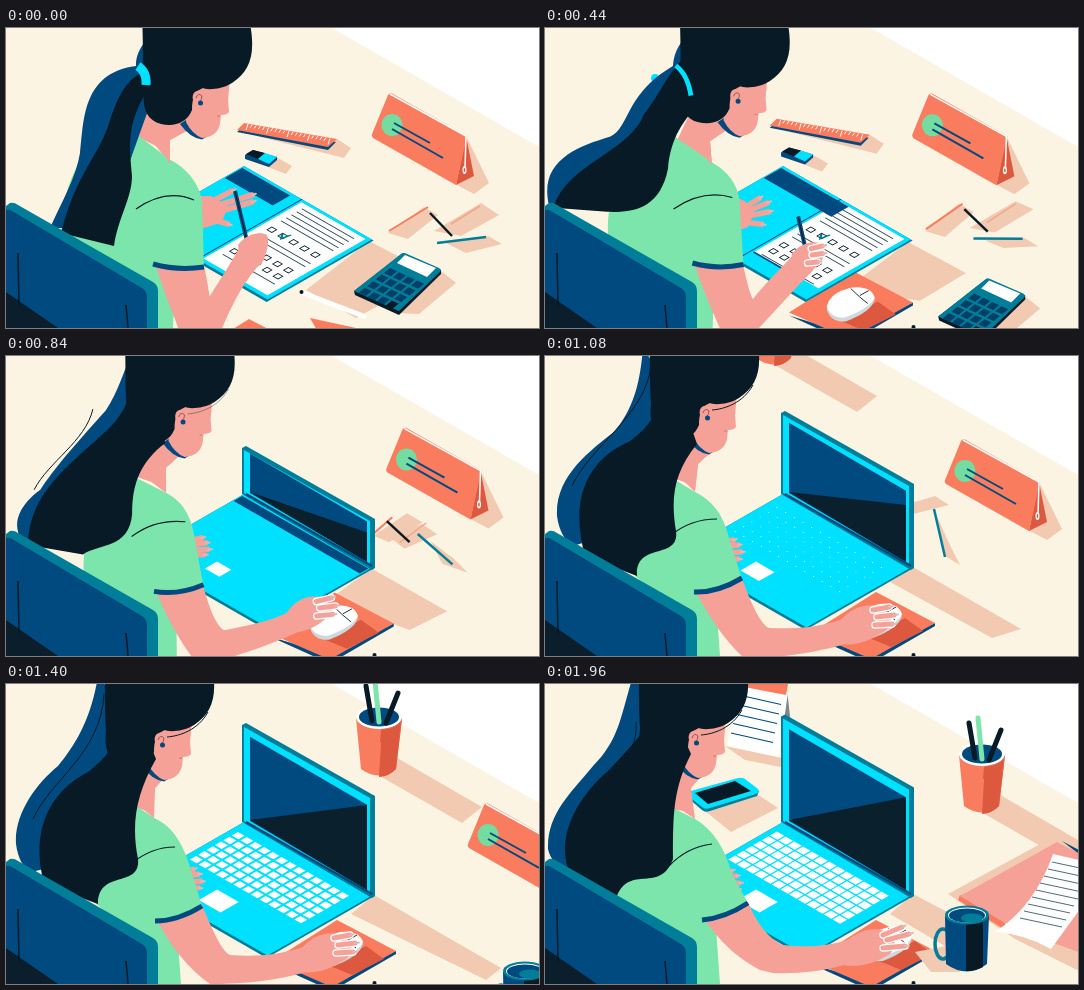
These frames come from a looping animation (533x300 px, 2000 ms). An HTML page with a canvas:

```html
<!DOCTYPE html>
<html lang="en">
<head>
<meta charset="utf-8">
<title>At the desk</title>
<style>
html, body { margin: 0; width: 100%; height: 100%; overflow: hidden; background: #fcf4e2; }
canvas { display: block; width: 100vw; height: 100vh; }
</style>
</head>
<body>
<canvas id="stage"></canvas>
<script>
const W = 533, H = 300, LOOP = 2000, STEP = 40;
const CREAM = '#fcf4e2', PEACH = '#f2cab1', ORANGE = '#fa7c5f', RUST = '#dc583f', CYAN = '#00e0ff',
  BLUE = '#004a7f', TEAL = '#007d98', INK = '#071a26', SKIN = '#f6a197', GREEN = '#7be5ab', WHITE = '#fff';

const canvas = document.getElementById('stage');
const ctx = canvas.getContext('2d');
let now = 0;

const numbers = s => String(s).match(/-?\d*\.?\d+/g).map(Number);

// Smooth, overshoot-free value between timed keys.
function ease(times, vals) {
  const last = times.length - 1;
  if (now <= times[0]) return vals[0];
  if (now >= times[last]) return vals[last];
  let i = 0;
  while (times[i + 1] < now) i++;
  const slope = k => (vals[k + 1] - vals[k]) / (times[k + 1] - times[k]);
  const tangent = k => {
    if (k === 0) return slope(0);
    if (k === last) return slope(last - 1);
    const a = slope(k - 1), b = slope(k);
    return a * b <= 0 ? 0 : 2 * a * b / (a + b);
  };
  const d = times[i + 1] - times[i], u = (now - times[i]) / d, v = 1 - u;
  return vals[i] * (1 + 2 * u) * v * v + tangent(i) * d * u * v * v
    + vals[i + 1] * u * u * (3 - 2 * u) - tangent(i + 1) * d * u * u * v;
}

// Keys map times to strings of one structure; the result is the pose for now.
function pose(keys) {
  const times = Object.keys(keys).map(Number);
  const sets = times.map(t => numbers(keys[t]));
  let i = 0;
  return String(keys[times[0]]).replace(/-?\d*\.?\d+/g, () => {
    const k = i++;
    return ease(times, sets.map(s => s[k])).toFixed(2);
  });
}
const value = keys => Number(pose(keys));

function fill(path, color) {
  ctx.fillStyle = color;
  ctx.fill(new Path2D(path));
}
function line(path, color, width = 1.5, cap = 'butt') {
  ctx.strokeStyle = color;
  ctx.lineWidth = width;
  ctx.lineCap = cap;
  ctx.stroke(new Path2D(path));
}
function oval(x, y, rx, ry, color) {
  ctx.beginPath();
  ctx.ellipse(x, y, rx, ry, 0, 0, 7);
  ctx.fillStyle = color;
  ctx.fill();
}
function at(keys, draw) {
  const [x, y] = numbers(pose(keys));
  ctx.save();
  ctx.translate(x, y);
  draw();
  ctx.restore();
}
// Desk plane: u runs along the hinge, v towards the writer.
function onDesk(draw) {
  ctx.save();
  ctx.transform(.87, .5, -.87, .5, 238, 138);
  draw();
  ctx.restore();
}
function box(x, y, w, h, color) {
  ctx.fillStyle = color;
  ctx.fillRect(x, y, w, h);
}

function shadows() {
  fill(pose({
    0: 'M363 213L428 247L350 290L300 262Z',
    240: 'M363 214L428 248L375 280L300 262Z',
    600: 'M363 214L416 243L375 270L300 262Z',
    1080: 'M368 211L476 273L447 282L345 226Z',
    1400: 'M368 211L495 284L480 296L345 230Z',
    1720: 'M368 211L430 246L402 268L345 230Z',
    1960: 'M368 210L425 240L400 262L345 230Z'
  }), PEACH);
}

function ruler() {
  fill('M331 111L345 120L338 130L250 108Z', PEACH);
  fill('M231 104L238 98L330 114L322 122Z', BLUE);
  fill('M238 95L331 111L322 119L231 102Z', ORANGE);
  let ticks = '';
  for (let i = 0; i < 21; i++) ticks += `M${242 + i * 4.1} ${96 + i * .72}l-2 ${i % 5 ? 3 : 6}`;
  line(ticks, WHITE, 1);
}

function eraser() {
  fill('M246 133L272 130L286 138L280 146Z', PEACH);
  fill('M239 127L247 122L271 129L271 132L263 139L239 131Z', BLUE);
  fill('M240 126L247 122L259 125L252 131Z', INK);
  fill('M252 131L259 125L271 129L263 136Z', CYAN);
}

function pouch() {
  fill('M461 110L483 155L468 166L432 147Z', PEACH);
  fill('M460 108L468 148L450 157Z', RUST);
  fill('M366 106L382 67Q384 64 387 66L461 108L450 157L367 110Q365 108 366 106Z', ORANGE);
  line('M384 66L460 108L459 140', WHITE, 1.5);
  oval(458.5, 142, 2, 4, WHITE);
  oval(458.5, 142, .8, 2, RUST);
  oval(386, 97, 10.5, 11, '#74dca0');
  line('M388 95L424 115M386 101L437 130', BLUE, 2);
}

function sticks() {
  fill(pose({
    0: 'M382 205L418 179L432 187L402 211Z', 240: 'M382 205L418 179L432 187L402 211Z',
    600: 'M377 199L408 170L424 179L396 205Z', 1080: 'M350 152L390 140L404 149L360 160Z',
    1300: 'M300 130L330 120L345 130L310 140Z'
  }), PEACH);
  fill(pose({
    0: 'M428 203L475 175L493 187L455 208Z', 240: 'M428 203L475 175L493 187L455 208Z',
    600: 'M418 195L462 171L480 177L440 200Z', 1080: 'M330 160L350 165L360 180L340 185Z'
  }), PEACH);
  fill(pose({
    0: 'M440 215L482 208L496 216L460 225Z', 240: 'M440 215L482 208L496 216L460 225Z',
    600: 'M440 208L473 211L488 220L455 214Z', 1080: 'M392 160L403 185L415 209L400 200Z',
    1300: 'M320 150L330 160L340 180L330 180Z'
  }), PEACH);
  line(pose({ 0: 'M383 203L422 179', 240: 'M383 203L422 179', 600: 'M377 198L410 171', 1080: 'M330 170L355 150' }), ORANGE, 2);
  line(pose({ 0: 'M445 196L474 178', 240: 'M445 196L474 178', 600: 'M436 192L464 173', 1080: 'M330 180L355 160' }), '#f0a68e', 1.5);
  line(pose({ 0: 'M424 185L446 208', 240: 'M424 184L447 207', 600: 'M411 177L435 199', 1080: 'M340 150L360 170' }), INK, 2.5);
  line(pose({
    0: 'M431 215L480 209', 240: 'M431 214L480 209', 600: 'M424 205L473 212',
    1080: 'M389 153L400 201', 1300: 'M320 150L335 190'
  }), TEAL, 2.5);
}

function calculator() {
  fill('M435 243L450 255L413 286L388 285Z', PEACH);
  fill('M348 263L397 225L435 242V246L393 287L349 267Z', INK);
  fill('M348 263L395 226Q398 224 401 226L433 240Q436 242 434 244L393 283Z', TEAL);
  fill('M399 227L430 240L421 249L391 235Z', WHITE);
  for (let r = 0; r < 4; r++) for (let c = 0; c < 4; c++) {
    fill(`M${384 + c * 9 - r * 8.4} ${240 + c * 4.2 + r * 6.6}l7 3.2l-6 5l-7 -3.2Z`, r === 3 && c === 3 ? INK : '#003f68');
  }
}

function cup() {
  fill('M450 108L540 160L520 176L436 128Z', PEACH);
  fill('M414 71L419 122Q437 135 454 122L460 71Z', ORANGE);
  fill('M440 80L437 130Q448 129 454 122L460 71Z', RUST);
  oval(437, 70, 23, 12, WHITE);
  oval(437, 70, 20, 9.5, BLUE);
  line('M424 39L430 74M456 46L444 76', INK, 5, 'round');
  line('M433 34L437 75', GREEN, 5, 'round');
  fill('M415 75Q437 91 459 75L458 88Q437 96 416 88Z', ORANGE);
  fill('M439 83Q452 82 459 75L457 92L438 95Z', RUST);
}

function mug() {
  fill('M401 262L370 268L386 288L415 288Z', PEACH);
  ctx.beginPath();
  ctx.ellipse(398, 260, 8, 15, 0, 0, 7);
  ctx.strokeStyle = TEAL;
  ctx.lineWidth = 3.5;
  ctx.stroke();
  fill('M400 232L401 280Q422 295 442 280L444 232Z', BLUE);
  fill('M421 240L421 287Q431 287 438 283L438 236Z', INK);
  oval(422, 231, 22, 9.5, TEAL);
  oval(422, 231, 19, 7.5, WHITE);
  oval(422, 231.5, 18, 7, BLUE);
  oval(427, 234, 11, 4.5, TEAL);
}

function phone() {
  fill('M160 127L212 110L233 124L186 148Z', PEACH);
  fill('M142 111L143 114L157 126Q160 129 165 127L212 112L214 107Z', TEAL);
  fill('M142 108L193 94Q197 93 200 95L213 105Q215 108 211 110L165 124Q160 126 157 123L143 112Z', CYAN);
  fill('M150 109L190 97L206 107L163 120Z', INK);
}

function notepad() {
  fill('M180 62L237 74L241 84L200 76Z', PEACH);
  fill('M242 6L245 32L238 46Z', '#7c8791');
  fill('M195 -5L243 8L234 73L182 62Z', WHITE);
  fill('M197 -6L243 0L241 11L194 2Z', ORANGE);
  for (let i = 0; i < 5; i++) line(`M${194 - i * 2} ${11 + i * 9.5}l42 9.5`, BLUE, 1.2);
}

function papers() {
  fill('M403 210L510 152L620 200L620 330L470 255Z', PEACH);
  fill('M517 157L560 180L560 190Z', BLUE);
  fill('M415 211L460 238V246L413 216Z', ORANGE);
  fill('M415 212L512 158L620 215L620 300L470 245Z', SKIN);
  fill('M508 170L565 183Q535 225 506 265Q480 250 450 248Q490 222 508 170Z', WHITE);
  for (let i = 0; i < 9; i++) line(`M${507 - i * 4} ${178 + i * 7}l42 9`, '#3c5a70', .9);
}

function mousePad() {
  fill('M258 282L318 309L382 272V269L318 300Z', BLUE);
  fill('M258 279L323 238L382 269L318 305Z', ORANGE);
}

function mouse() {
  fill('M306 287L344 268L362 281L330 297Z', RUST);
  fill('M293 276Q296 260 318 255Q338 253 341 266Q338 278 312 288Q297 289 293 276Z', '#cfd8dc');
  fill('M293 273Q296 259 318 254Q337 252 341 264Q336 275 311 284Q297 285 293 273Z', WHITE);
  line('M317 255Q326 264 334 270M326 262L335 257', INK, .9);
}

function sheet() {
  const end = value({ 0: 116, 240: 116, 600: 78, 800: 3 });
  const band = value({ 0: 57, 240: 58, 600: 111, 720: 147 });
  const seam = value({ 0: 1, 500: 1, 800: 0 });
  if (seam > 0) box(66, 0, 1.2 * seam, 120, BLUE);
  if (end > 4) {
    ctx.save();
    ctx.beginPath();
    ctx.rect(69, 3, 74, end - 3);
    ctx.clip();
    box(69, 3, 74, 113, WHITE);
    for (const v of [9, 15, 21, 27, 33, 59, 65, 100]) box(76, v, 60, 1, '#29434f');
    ctx.strokeStyle = INK;
    ctx.lineWidth = .9;
    for (const v of [45, 76, 88]) for (let i = 0; i < 5; i++) ctx.strokeRect(77 + i * 12.5, v, 5.5, 5.5);
    line('M90 46L94 51L96 42', TEAL, 2);
    ctx.restore();
    if (now > 400) box(69, end, 42, Math.min(9, (now - 400) / 22), BLUE);
  }
  const fade = value({ 0: 20, 600: 20, 1000: 0 });
  box(1, 3, band - 2, fade, BLUE);
}

function keyboard() {
  const pad = value({ 520: 0, 640: .4, 1080: .85, 1400: 1 });
  box(52, 83, 25 * pad, 21 * pad, WHITE);
  const size = value({ 1040: 0, 1400: .9, 1720: 1 });
  if (size <= 0) return;
  for (let r = 0; r < 6; r++) for (let c = 0; c < 13; c++) {
    box(6 + c * 10 + (1 - size) * 4, 13 + r * 9.6 + (1 - size) * 4, 8.6 * size, 8 * size, WHITE);
  }
}

function base() {
  onDesk(() => {
    box(0, 0, 149, 123, TEAL);
    box(0, 0, 147, 120, CYAN);
    sheet();
    keyboard();
  });
}

function lid() {
  const h = value({ 600: 0, 1080: 81, 1400: 97, 1720: 104, 1960: 105.5 });
  if (h < 1) return;
  const top = .88 * h;
  fill(`M236 138V${138 - h}L240 ${136 - h}L369 ${209 - h}V212L366 214Z`, TEAL);
  fill(`M238 137V${140 - h}L364 ${211 - h}V209Z`, CYAN);
  fill(`M244 137V${138 - top}L361 ${206 - top}V206Z`, BLUE);
  const glare = Math.max(206 - top, value({ 600: 206, 1080: 149, 1400: 121, 1960: 109 }));
  fill(`M244 136L361 ${glare}V206Z`, '#0a202d');
  line('M240 138L366 210', BLUE, 2.5);
}

function fingers(path, width) {
  line(path, SKIN, width, 'round');
  const n = numbers(path);
  for (let i = 0; i < n.length; i += 4) {
    const a = Math.atan2(n[i + 3] - n[i + 1], n[i + 2] - n[i]);
    line(`M${n[i + 2]} ${n[i + 3]}l${4 * Math.cos(a)} ${4 * Math.sin(a)}`, '#dfb9b5', 2, 'round');
  }
}

function leftHand() {
  fill(pose({
    0: 'M188 168L205 168L222 178L216 194L190 203Z', 240: 'M188 168L207 170L220 182L212 197L190 204Z',
    600: 'M180 165L193 176L199 186L196 200L185 206Z', 1080: 'M175 178L182 182L186 190L186 202L178 206Z',
    1960: 'M175 182L181 185L185 193L185 204L178 208Z'
  }), SKIN);
  fingers(pose({
    0: 'M205 174L226 163M210 178L246 167M212 184L246 174M208 192L222 196',
    240: 'M208 177L222 162M210 182L236 166M212 187L238 177M208 193L226 198',
    600: 'M190 182L207 178M190 186L212 183M190 190L213 189M188 195L207 195',
    1080: 'M178 187L188 184M178 191L193 189M178 197L196 196M176 202L193 203',
    1960: 'M178 190L186 187M178 194L191 192M178 200L194 199M176 204L192 205'
  }), 5.5);
}

function arm() {
  fill(pose({
    0: 'M150 238L198 238C203 260 203 268 204 268C215 250 225 235 238 212L258 232C245 245 232 262 214 305L174 305C167 285 158 265 150 238Z',
    240: 'M150 238L199 236C203 250 205 262 206 264C215 245 228 225 240 210L258 232C240 250 228 275 212 305L176 305C168 285 158 262 150 238Z',
    600: 'M150 238L197 236C202 260 205 270 210 276C230 262 250 252 262 240L280 255C255 275 225 295 205 308L180 308C168 285 158 262 150 238Z',
    1080: 'M152 238L197 222C205 245 215 268 224 272C250 273 275 272 300 262L300 288C270 297 240 300 215 303L200 303C180 285 165 262 152 238Z',
    1400: 'M152 238L196 221C206 245 216 268 224 271C250 273 275 271 300 262L300 288C270 297 240 299 215 300L204 300C182 285 165 262 152 238Z',
    1720: 'M156 236L201 218C212 240 225 260 236 264C262 266 285 264 308 258L305 282C275 288 250 292 225 291L215 290C195 280 175 262 156 236Z',
    1960: 'M160 236L203 218C212 240 225 256 238 261C262 264 285 262 305 255L303 280C275 288 250 290 228 289L215 286C195 275 178 262 160 236Z'
  }), SKIN);
}

function rightHand() {
  fill(pose({
    0: 'M232 217C240 205 255 203 261 207C264 215 260 228 255 236C248 242 240 240 235 238Z',
    240: 'M236 213C244 203 262 203 267 207C268 215 264 226 256 236C248 240 242 240 238 236Z',
    600: 'M258 242C265 228 280 222 290 228C298 232 296 240 290 244C285 252 275 257 268 257Z',
    1080: 'M295 265C305 252 320 247 335 250C345 255 350 265 340 275C325 285 310 290 296 288Z',
    1400: 'M295 265C305 252 320 247 335 250C345 255 350 265 340 275C325 285 310 290 296 288Z',
    1960: 'M300 258C312 248 325 242 340 247C352 252 352 262 345 270C330 279 315 284 298 281Z'
  }), SKIN);
  const path = pose({
    0: 'M248 213L256 211M248 219L256 218M246 227L253 227',
    240: 'M252 212L261 211M252 219L260 218M248 227L255 227',
    600: 'M282 231L295 227M284 237L297 235M280 245L293 243',
    1080: 'M328 254L344 251M332 261L349 259M330 269L347 268',
    1400: 'M328 254L344 251M332 261L349 259M330 269L347 268',
    1960: 'M338 251L357 243M342 256L364 250M338 264L360 262'
  });
  if (now < 440) line(path, SKIN, 5, 'round');
  else {
    line(path, WHITE, 7.5, 'round');
    fingers(path, 5);
  }
}

function pen() {
  const path = pose({ 0: 'M229 163L241 213', 240: 'M239 165L246 212', 600: 'M268 217L275 229', 720: 'M284 236L285 238' });
  if (now < 720) {
    line(path, BLUE, 4);
    line(path.replace('M', 'M'), INK, 1);
  }
}

function torso() {
  fill(pose({ 0: 'M120 190L170 230L167 300H120Z', 600: 'M120 190L170 230L168 300H120Z', 1080: 'M120 190L170 230L175 300H120Z' }), GREEN);
}

function shirt() {
  fill(pose({
    0: 'M120 98L163 131Q190 145 196 172L198 240Q172 244 147 237L150 262L100 240L55 205Q58 120 120 98Z',
    240: 'M125 95L165 132Q192 148 196 172L199 238Q172 243 148 236L150 262L100 240L62 205Q68 130 125 95Z',
    600: 'M130 118L170 137Q188 148 192 170L198 237Q172 243 147 236L150 262L100 240L64 208Q52 150 130 118Z',
    1080: 'M127 122L150 136Q176 148 184 182L197 223Q172 239 149 237L150 262L120 245L90 220Q100 150 127 122Z',
    1400: 'M127 120L150 135Q172 145 183 180L196 222Q172 238 149 238L150 262L120 245L88 218Q100 150 127 120Z',
    1720: 'M128 124L152 137Q175 150 186 185L201 219Q178 235 154 237L150 262L120 245L76 213Q95 150 128 124Z',
    1960: 'M128 124L150 135Q176 150 187 190L203 219Q180 236 157 237L150 262L120 245L72 212Q95 150 128 124Z'
  }), GREEN);
  line(pose({
    0: 'M147 236Q172 243 198 239', 240: 'M148 235Q172 242 199 237', 600: 'M147 235Q172 242 198 236',
    1080: 'M149 236Q172 237 197 222', 1400: 'M149 237Q172 237 196 222', 1720: 'M154 236Q178 234 201 219', 1960: 'M157 236Q180 234 203 219'
  }), BLUE, 5);
  line(pose({
    0: 'M130 181Q160 160 188 172', 240: 'M130 181Q160 160 188 170', 600: 'M127 181Q155 162 186 169',
    1080: 'M125 180Q145 163 172 163', 1400: 'M125 180Q145 163 169 163', 1960: 'M124 182Q142 163 167 160'
  }), INK, 1.2);
}

function neck() {
  fill(pose({
    0: 'M138 84L122 104L150 118L164 136L164 112L186 100L183 80Z',
    240: 'M140 82L130 106L150 118L165 136L165 112L186 100L183 80Z',
    600: 'M148 88L133 118L150 126L168 137L165 114L182 100L180 75Z',
    1080: 'M138 90L127 122L140 126L150 136L153 108L166 96L150 65Z',
    1400: 'M134 90L127 122L138 126L148 134L149 104L158 94L145 62Z',
    1960: 'M133 90L127 125L138 127L150 135L146 104L156 92L140 62Z'
  }), SKIN);
}

const headMoves = { 0: '0 0', 240: '0 0', 600: '-4 -4', 1080: '-32 -13', 1400: '-38 -14', 1720: '-42 -15', 1960: '-43 -16' };

function face() {
  fill('M174 96Q184 110 196 111.5L208 104L190 85Z', BLUE);
  fill('M180 70L200 55L224 50L222 72L223 84Q221 87 215 87L214 96Q211 109 196 110Q186 106 180 94Z', SKIN);
  line('M214 88L211 88', '#d9776f', 1);
}

function headHair() {
  fill('M135 -30L238 -30C252 20 248 40 226 55C215 62 200 62 197 60C188 63 186 72 186 82C181 95 168 99 155 96C140 92 136 80 138 60C136 30 138 15 135 -30Z', INK);
  fill('M187 72C185 64 192 60 198 64C201 70 198 78 193 81Q188 82 187 72Z', SKIN);
  line('M190 70Q192 64 196 68Q196 72 193 74', '#a84f55', 1);
  oval(194.5, 75, 2.5, 2.5, BLUE);
  const loose = value({ 700: 0, 1080: 1 });
  if (loose > 0) {
    ctx.globalAlpha = loose;
    line('M240 42C230 60 212 66 199 67', INK, 1);
    ctx.globalAlpha = 1;
  }
}

function backHair() {
  at({ 1080: '110 50', 1400: '69 67', 1720: '90 90' }, () => oval(0, 0, 4, 4, CYAN));
  fill(pose({
    0: 'M152 -5C140 15 130 20 130 38C75 45 78 95 74 125C70 150 55 175 44 200L100 200L150 60Z',
    240: 'M152 -5C140 10 128 20 130 38C72 50 85 95 70 110C40 130 10 130 7 180L60 190L150 60Z',
    600: 'M155 -5C135 10 130 20 124 38C85 80 85 105 60 108C25 115 -14 140 4 180L60 170L150 40Z',
    1080: 'M98 -8C95 25 90 50 70 75C45 95 10 120 12 160C14 175 20 185 28 190L60 180L130 40Z',
    1400: 'M92 -8C85 35 70 60 52 82C30 100 8 130 10 160C12 175 18 185 25 188L60 180L130 40Z',
    1720: 'M90 -8C78 30 70 55 52 80C30 105 3 130 5 160C7 175 12 185 20 188L60 180L130 40Z',
    1960: 'M88 -8C76 30 75 55 48 82C25 110 2 130 3 165C5 175 12 182 20 186L60 180L130 40Z'
  }), BLUE);
  line(pose({
    600: 'M55 125C45 128 38 132 30 140', 1080: 'M106 10C100 60 45 90 27 130',
    1400: 'M98 10C95 70 45 95 27 135', 1960: 'M91 38C95 80 50 95 35 125'
  }), INK, now < 560 ? .01 : 1);
}

function tail() {
  fill(pose({
    0: 'M150 40C120 45 112 70 104 92C95 125 70 145 55 205L108 218C112 190 126 170 126 148C124 120 118 95 146 56Z',
    240: 'M150 40C115 50 105 75 92 102C75 135 25 145 22 185L62 200C85 178 122 178 125 142C122 120 122 95 146 58Z',
    600: 'M160 -5C130 30 130 50 104 75C90 115 20 130 4 178L62 177C95 190 112 180 122 140C127 115 140 95 165 85Z',
    1080: 'M118 -10C118 50 112 65 85 85C40 105 25 145 40 200L92 220C90 185 135 205 131 175C125 140 130 115 152 88Z',
    1400: 'M115 -10C115 50 112 65 82 88C40 110 25 150 38 200L92 220C92 185 135 205 132 175C125 140 130 110 150 75Z',
    1720: 'M110 -10C114 40 100 55 75 80C40 110 15 140 25 190L78 213C88 180 122 215 128 178C128 130 130 105 148 70Z',
    1960: 'M110 -10C114 40 92 55 65 85C30 115 10 155 25 190L72 212C85 180 115 210 128 175C128 130 128 105 146 70Z'
  }), INK);
}

function band() {
  if (now >= 760) return;
  line(pose({ 0: 'M132 38Q141 44 140 57', 240: 'M133 37Q142 45 141 58', 600: 'M127 38Q143 48 149 74', 760: 'M118 38Q128 50 132 72' }),
    CYAN, value({ 0: 9, 240: 8, 600: 2, 760: .5 }));
}

function chair() {
  fill('M0 178L4 175Q8 174 12 177L147 254Q152 257 152 263V300H0Z', TEAL);
  fill('M0 182Q3 181 6 183L136 260Q141 263 141 269V300H0Z', BLUE);
  fill('M0 264L52 300H0Z', '#0b1e2b');
  line('M12 225L13 278M120 277L122 300', INK, 1.5);
}

function scene() {
  box(0, 0, W, H, CREAM);
  fill('M326 0H533V119Z', WHITE);

  shadows();
  at({ 0: '0 0', 240: '0 0', 600: '-19 -13', 840: '-160 -140' }, ruler);
  at({ 0: '0 0', 240: '0 0', 600: '-9 -8', 840: '-100 -160' }, eraser);
  sticks();
  at({ 1000: '-300 -180', 1080: '-208 -120', 1400: '-64 -37', 1720: '-17 -9', 1960: '0 0' }, cup);
  at({ 0: '0 0', 240: '0 0', 600: '4 1', 1080: '34 18', 1400: '96 54', 1640: '200 115' }, pouch);
  at({ 0: '0 0', 240: '15 9', 600: '85 47', 800: '200 110' }, calculator);
  at({ 1400: '-60 -150', 1560: '-50 -60', 1720: '-18 -10', 1960: '0 0' }, phone);
  at({ 1500: '-90 -110', 1720: '-45 -32', 1960: '0 0' }, notepad);
  at({ 1400: '200 110', 1720: '73 39', 1960: '0 0' }, papers);

  at({ 0: '-80 53', 240: '-43 20', 600: '0 0', 1080: '8 -2', 1960: '8 -2' }, mousePad);
  at({ 0: '-80 53', 240: '-33 18', 600: '0 0', 1080: '16 -6', 1400: '16 -6', 1960: '26 -11' }, mouse);
  if (now < 160) at({ 0: '0 0', 160: '30 16' }, () => fill('M304 290L350 300L312 304Z', ORANGE));
  const pencil = pose({ 0: 'M297 265L360 289', 240: 'M334 266L366 303', 400: 'M370 300L400 340' });
  const [px, py] = numbers(pencil);
  line(pencil, WHITE, 5);
  oval(px - 1.5, py - 1, 2, 2, INK);

  base();
  lid();
  at({ 1240: '180 105', 1400: '97 56', 1720: '19 10', 1960: '0 0' }, mug);

  leftHand();
  torso();
  arm();
  pen();
  rightHand();
  neck();
  shirt();
  fill(pose({
    0: 'M138 84L123 104Q152 112 164 136L164 112L186 100Z', 240: 'M140 82L131 104Q152 114 165 136L165 112L186 100Z',
    600: 'M148 88L133 118Q156 124 168 137L165 114L182 100Z', 1080: 'M138 90L127 122Q140 124 150 134L153 108L166 96Z',
    1400: 'M134 90L127 122Q138 124 146 132L149 104L158 94Z', 1960: 'M133 90L127 125Q138 125 144 130L146 104L156 92Z'
  }), SKIN);
  at(headMoves, face);
  backHair();
  tail();
  at(headMoves, headHair);
  band();
  chair();
}

function frame(time) {
  const scale = window.devicePixelRatio || 1;
  const w = Math.round(W * scale), h = Math.round(H * scale);
  if (canvas.width !== w || canvas.height !== h) {
    canvas.width = w;
    canvas.height = h;
  }
  ctx.setTransform(w / W, 0, 0, h / H, 0, 0);
  now = Math.floor((time % LOOP) / STEP) * STEP;
  scene();
  requestAnimationFrame(frame);
}
requestAnimationFrame(frame);
</script>
</body>
</html>
```
